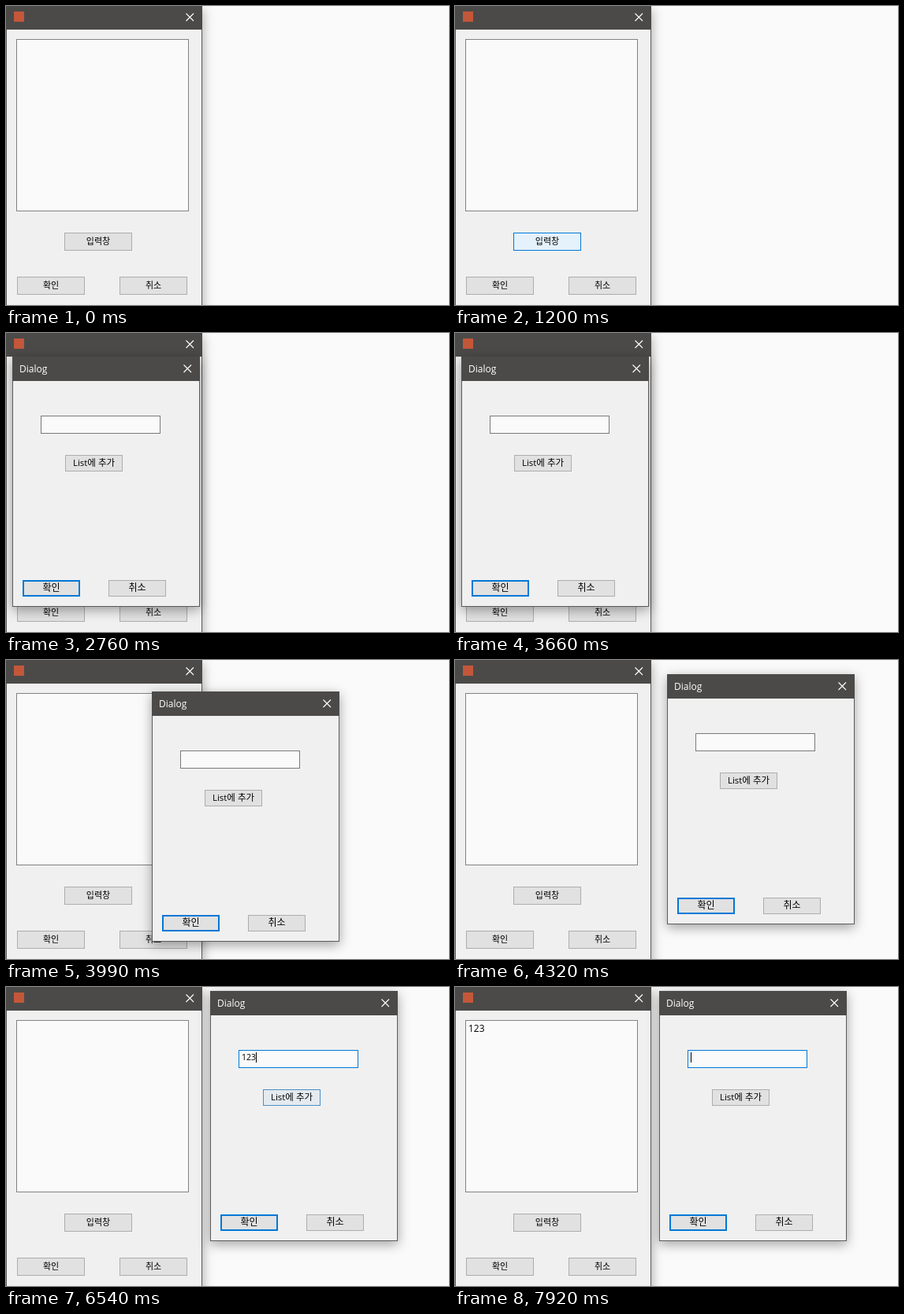
Animation, 562 px wide and 380 px high, one loop 8 s. Source, as an HTML page:

```html
<!DOCTYPE html>
<html lang="ko">
<head>
<meta charset="utf-8">
<title>Dialog</title>
<style>
  * { box-sizing: border-box; }
  html, body { margin: 0; width: 100%; height: 100%; overflow: hidden; background: #fafafa; }
  body { position: relative; font: 12px "Open Sans", "Noto Sans CJK KR", "Noto Sans CJK", sans-serif; color: #000; }
  div, span, svg { position: absolute; white-space: nowrap; }

  .window { background: #f0f0f0; box-shadow: inset 0 0 0 1px #5c5b59, 0 4px 14px rgba(0, 0, 0, .36); }
  .title { left: 0; top: 0; width: 100%; background: #4b4a48; color: #fff; }
  .close { width: 11px; height: 11px; fill: none; stroke: #fff; stroke-width: 1.1; }
  .button { border: 1px solid #adadad; background: #e1e1e1; text-align: center; }
  .field { background: #fafafa; border: 1px solid #7a7a7a; }

  .main { left: 0; top: 0; width: 249px; height: 410px; }
  .main .title { height: 30px; }
  .main .close { left: 228px; top: 9px; }
  .main .button { width: 86px; height: 23px; font-size: 11px; line-height: 20px; }
  .icon { left: 10px; top: 7px; width: 13px; height: 13px; background: #c4573a; }
  .list { left: 13px; top: 42px; width: 219px; height: 219px; border-color: #828282; }
  .item { left: 3px; top: 1px; line-height: 17px; }

  .dialog { left: 8px; top: 30px; width: 238px; height: 318px; }
  .dialog .title { height: 31px; padding-left: 9px; line-height: 31px; }
  .dialog .close { left: 217px; top: 10px; }
  .dialog .button { width: 73px; height: 21px; line-height: 18px; }
  .dialog .add { font-size: 11.5px; }
  .edit { left: 36px; top: 75px; width: 152px; height: 23px; }
  .typed { left: 3px; top: 2px; height: 13px; box-sizing: content-box; overflow: hidden;
           font-size: 10.5px; line-height: 13px; border-right: 1px solid #000; }

  /* One shared 8 s timeline: 1% = 80 ms */
  .open, .item, .dialog, .edit, .add, .ok, .typed { animation: 8s linear infinite; }
  .open { animation-name: open; }
  .item { animation-name: item; animation-timing-function: step-end; }
  .dialog { animation-name: appear, drag; }
  .edit { animation-name: edit; }
  .add { animation-name: add; }
  .ok { animation-name: ok; animation-timing-function: step-end; }
  .typed { animation-name: type; animation-timing-function: step-end; }

  @keyframes open {
    0%, 12.5% { background: #e1e1e1; border-color: #adadad; }
    14.9%, 29.98% { background: #e5f1fb; border-color: #0078d7; }
    30%, 30.75% { background: #cce4f7; border-color: #005499; }
    33.8%, 100% { background: #e1e1e1; border-color: #adadad; }
  }
  @keyframes appear {
    0%, 30.7% { opacity: 0; transform: scale(.9); animation-timing-function: cubic-bezier(.1, .7, .3, 1); }
    34.4%, 100% { opacity: 1; transform: none; }
  }
  @keyframes drag {
    0% { left: 8px; top: 30px; }
    48% { left: 8px; top: 30px; animation-timing-function: steps(3); }
    49.125% { left: 98px; top: 38px; animation-timing-function: steps(2); }
    49.875% { left: 185px; top: 40px; animation-timing-function: steps(4); }
    51.375% { left: 241px; top: 34px; animation-timing-function: steps(7); }
    54% { left: 269px; top: 18px; animation-timing-function: steps(4); }
    55.5% { left: 269px; top: 10px; animation-timing-function: steps(7); }
    58.125%, 100% { left: 259px; top: 5px; }
  }
  @keyframes edit {
    0%, 39.2% { border-color: #7a7a7a; }
    40.9%, 42.5% { border-color: #171717; }
    45.7%, 61.9% { border-color: #7a7a7a; }
    63.5%, 64.5% { border-color: #171717; }
    65.6%, 83.6% { border-color: #0078d7; }
    84.8%, 87% { border-color: #7a7a7a; }
    88.2%, 88.6% { border-color: #171717; }
    89.25%, 100% { border-color: #0078d7; }
  }
  @keyframes add {
    0%, 37.7% { background: #e1e1e1; border-color: #adadad; }
    39% { background: #e5f1fb; border-color: #0078d7; }
    40.9%, 80.8% { background: #e1e1e1; border-color: #adadad; }
    82.5%, 83.6% { background: #e5f1fb; border-color: #0078d7; box-shadow: none; }
    83.63%, 84.9% { background: #cce4f7; border-color: #005499; box-shadow: none; }
    85.8%, 86.5% { background: #e5f1fb; border-color: #0078d7; box-shadow: inset 0 0 0 1px #0078d7; }
    88%, 88.85% { background: #e1e1e1; border-color: #0078d7; box-shadow: inset 0 0 0 1px #0078d7; }
    89.25%, 100% { background: #e1e1e1; border-color: #adadad; box-shadow: none; }
  }
  @keyframes ok {
    0%, 88.875%, 100% { border-color: #0078d7; box-shadow: inset 0 0 0 1px #0078d7; }
    83.63% { border-color: #adadad; box-shadow: none; }
  }
  @keyframes item {
    0% { visibility: hidden; }
    85.125%, 100% { visibility: visible; }
  }
  @keyframes type {
    0% { width: 0; border-color: transparent; }
    64.875% { width: 0; border-color: #000; }
    72% { width: 0; border-color: transparent; }
    72.75% { width: 6px; border-color: #000; }
    73.875% { width: 12px; border-color: #000; }
    75.375% { width: 18px; border-color: #000; }
    82% { width: 18px; border-color: transparent; }
    88.875% { width: 18px; border-color: #000; }
    95.25% { width: 12px; border-color: #000; }
    97.125% { width: 6px; border-color: #000; }
    99%, 100% { width: 0; border-color: #000; }
  }
</style>
</head>
<body>
  <div class="window main">
    <div class="title">
      <span class="icon"></span>
      <svg class="close" viewBox="0 0 11 11"><path d="M.5 .5l9.5 9.5M10 .5l-9.5 9.5"/></svg>
    </div>
    <div class="field list"><span class="item">123</span></div>
    <div class="button open" style="left:74px;top:288px">입력창</div>
    <div class="button" style="left:14px;top:344px">확인</div>
    <div class="button" style="left:144px;top:344px">취소</div>
  </div>

  <div class="window dialog">
    <div class="title">Dialog
      <svg class="close" viewBox="0 0 11 11"><path d="M.5 .5l9.5 9.5M10 .5l-9.5 9.5"/></svg>
    </div>
    <div class="field edit"><span class="typed">123</span></div>
    <div class="button add" style="left:67px;top:125px">List에 추가</div>
    <div class="button ok" style="left:13px;top:284px">확인</div>
    <div class="button" style="left:122px;top:284px">취소</div>
  </div>
</body>
</html>
```
